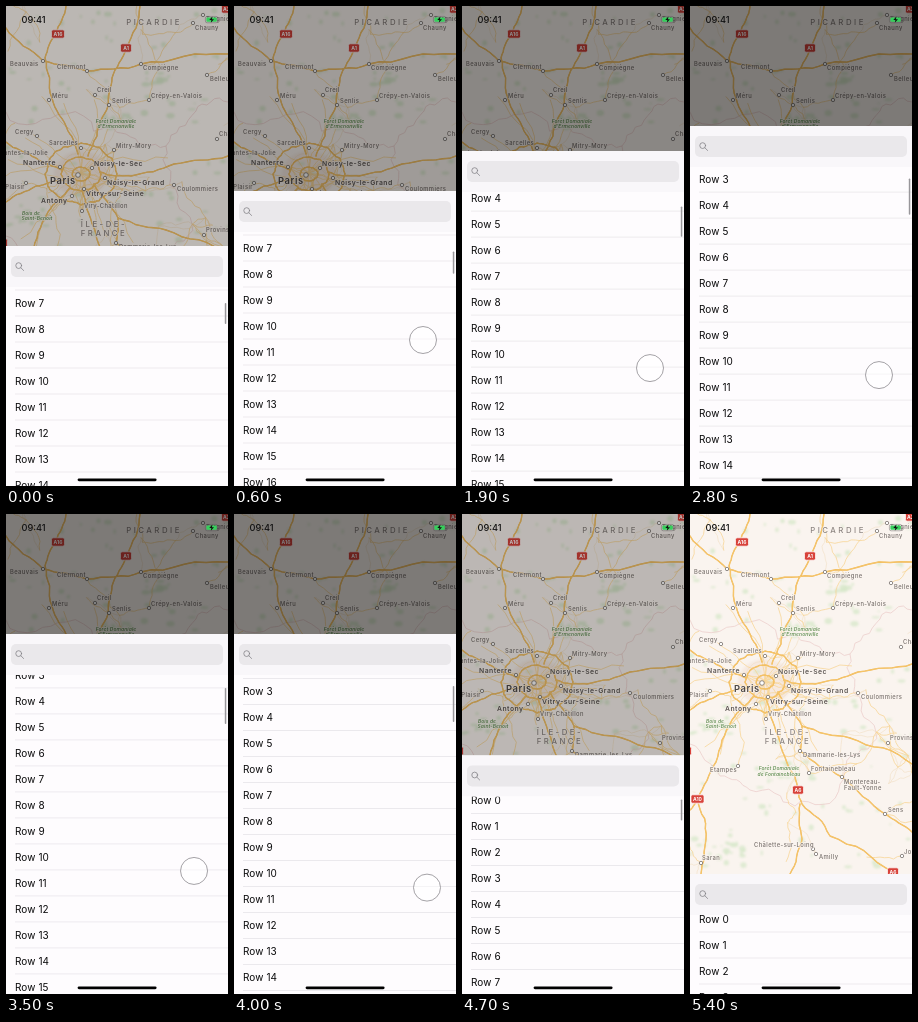
Write an HTML page that moves like this. It is 222 px wide and 480 px high and loops after 5.5 s.

```html
<!DOCTYPE html>
<html lang="en">
<head>
<meta charset="utf-8">
<title>Map drawer</title>
<style>
  html, body { margin: 0; width: 100%; height: 100%; overflow: hidden; background: #fff; }
  svg { display: block; width: 100vw; height: 100vh; font-family: Inter, Roboto, sans-serif; }
  .label { paint-order: stroke; stroke: #fbf5f0; stroke-width: 1.3px; stroke-opacity: .85; stroke-linejoin: round; }
  .town { font-size: 5.8px; font-weight: 500; letter-spacing: .42px; fill: #77706c; }
  .city { font-size: 6.8px; font-weight: 600; letter-spacing: .5px; fill: #5c5653; }
  .capital { font-size: 9.4px; font-weight: 600; letter-spacing: .6px; fill: #4c4745; }
  .wood { font-size: 4.9px; font-weight: 600; font-style: italic; letter-spacing: .12px; fill: #67945a; text-anchor: middle; }
  .region { font-size: 7.8px; font-weight: 500; letter-spacing: 2.5px; fill: #8b8480; text-anchor: middle; }
  .badge { font-size: 5px; font-weight: 700; fill: #fff; text-anchor: middle; }
  .row { font-size: 10px; font-weight: 400; letter-spacing: .08px; fill: #0b0b0c; }
</style>
</head>
<body>
<svg viewBox="0 0 222 480" preserveAspectRatio="none">
  <defs>
    <clipPath id="listClip"><rect y="41" width="222" height="460"/></clipPath>
    <filter id="soft" x="-30%" y="-30%" width="160%" height="160%"><feGaussianBlur stdDeviation=".8"/></filter>
  </defs>
  <rect width="222" height="480" fill="#faf4ef"/>
  <g id="land" filter="url(#soft)"></g>
  <g id="roads" fill="none" stroke-linejoin="round" stroke-linecap="round"></g>
  <g id="labels"></g>
  <rect id="dim" width="222" height="480"/>
  <g id="sheet">
    <rect width="222" height="480" fill="#fefcfe"/>
    <g clip-path="url(#listClip)"><g id="rows"></g></g>
    <rect width="222" height="41" fill="#f9f7fa"/>
    <rect x="5" y="10" width="212" height="21" rx="5" fill="#eae8eb"/>
    <g fill="none" stroke="#858388" stroke-width=".8" stroke-linecap="round">
      <circle cx="12.7" cy="19.6" r="2.9"/><path d="M14.9 21.8L17.6 24.5"/>
    </g>
  </g>
  <rect id="bar" x="218.8" width="1.5" rx=".75" fill="#98969a"/>
  <circle id="touch" r="13.5" fill="#fff" fill-opacity=".5" stroke="#8d8b90" stroke-width=".8"/>
  <text x="15.5" y="17.2" font-size="9.2" font-weight="500" fill="#111">09:41</text>
  <rect x="199.4" y="10.4" width="12.4" height="6.4" rx="1.8" fill="none" stroke="#555" stroke-opacity=".6" stroke-width=".7"/>
  <rect x="200.4" y="11.4" width="10.4" height="4.4" rx="1" fill="#35d05b"/>
  <path d="M212.7 12.4Q214.2 13.6 212.7 14.8Z" fill="#555" fill-opacity=".7"/>
  <path d="M206.4 10.6L203.3 14H205.4L204.8 16.8L208 13.2H205.9Z" fill="#111"/>
  <rect x="71.6" y="472.4" width="79" height="2.8" rx="1.4" fill="#000"/>
</svg>
<script>
const LOOP = 5500, TOP = 120, BOTTOM = 360, PITCH = 26, HEAD = 41;
const $ = id => document.getElementById(id);

function add(parent, tag, attrs, text) {
  const el = document.createElementNS('http://www.w3.org/2000/svg', tag);
  for (const k in attrs) el.setAttribute(k, attrs[k]);
  if (text !== undefined) el.textContent = text;
  parent.appendChild(el);
  return el;
}

let seed = 41;
const rand = () => (seed = (seed * 16807) % 2147483647) / 2147483647;

// Splits a polyline with small random bends so it reads as a road.
function wander(points, bend) {
  for (let pass = 0; pass < 3; pass++) {
    const out = [points[0]];
    for (let i = 1; i < points.length; i++) {
      const [x, y] = points[i - 1], [u, v] = points[i];
      const k = (rand() - .5) * bend;
      out.push([(x + u) / 2 + (v - y) * k, (y + v) / 2 - (u - x) * k], [u, v]);
    }
    points = out;
  }
  return 'M' + points.map(p => p[0].toFixed(1) + ' ' + p[1].toFixed(1)).join('L');
}

function pairs(line) {
  const n = line.split(' ').map(Number);
  return n.filter((_, i) => i % 2 < 1).map((x, i) => [x, n[2 * i + 1]]);
}

// name, label x, baseline, dot x, dot y, class, anchor
const towns = [
  ['Beauvais', 4, 60, 37, 55], ['Clermont', 51, 63, 81, 65], ['Compiègne', 137, 64, 135, 58],
  ['Creil', 91, 86, 89, 89], ['Senlis', 106, 97, 103, 99], ['Méru', 46, 92, 43, 94],
  ['Crépy-en-Valois', 145, 92, 143, 94], ['Chauny', 189, 24, 187, 17], ['Tergnier', 200, 15, 197, 9],
  ['Belleu', 204, 75, 201, 69], ['Cergy', 9, 128, 31, 130], ['Sarcelles', 43, 139, 75, 142],
  ['Mitry-Mory', 110, 142, 108, 144], ['Château', 213, 130, 211, 133],
  ['Nanterre', 17, 159, 54, 161, 'city'], ['Noisy-le-Sec', 88, 160, 86, 162, 'city'],
  ['Paris', 44, 177.5, 72, 169, 'capital'], ['Noisy-le-Grand', 101, 179, 99, 172, 'city'],
  ['Vitry-sur-Seine', 80, 190, 78, 183, 'city'], ['Antony', 35, 196.5, 66, 190, 'city'],
  ['Coulommiers', 171, 185, 168, 179], ['Plaisir', 19, 183, 20, 177, 'town', 'end'],
  ['Mantes-la-Jolie', 42, 149, -5, 143, 'town', 'end'], ['Viry-Châtillon', 78, 202, 76, 205],
  ['Dammarie-les-Lys', 113, 243, 110, 237], ['Étampes', 20, 258, 48, 252],
  ['Fontainebleau', 121, 257, 119, 259], ['Montereau-', 154, 270, 152, 263], ['Fault-Yonne', 154, 276],
  ['Provins', 200, 226, 198, 229], ['Sens', 198, 298, 195, 300],
  ['Châlette-sur-Loing', 64, 333, 123, 335], ['Amilly', 129, 345, 126, 340],
  ['Saran', 12, 346, 11, 349], ['Joigny', 214, 340, 212, 342]
];
const woods = [
  ['Forêt Domaniale', 110, 117], ["d'Ermenonville", 110, 122], ['Bois de', 25, 209], ['Saint-Benoît', 31, 214],
  ['Forêt Domaniale', 89, 256], ['de Fontainebleau', 89, 261.5]
];
const regions = [['PICARDIE', 148, 19], ['ÎLE-DE-', 98, 221], ['FRANCE', 98, 230]];
const badges = [['A16', 52, 28], ['A1', 120, 42], ['A6', 108, 276], ['A10', 7.5, 285], ['A6', 203, 358], ['A11', -5, 237], ['A26', 222, 3]];
const highways = [
  '60 0 50 28 39 52 46 92 62 125 72 148', '134 0 121 42 106 72 102 100 91 130 82 150',
  '94 166 125 170 168 158 222 150', '88 178 112 212 160 224 222 250', '76 184 88 222 105 262 112 290 140 322 204 358',
  '64 182 42 206 26 248 8 285 0 296', '56 164 30 152 0 136', '58 174 30 180 0 196', '110 290 112 325 100 360',
  '8 285 16 325 11 360', '0 22 37 55 81 65 135 58 222 48', '112 212 110 237 152 263 195 300 222 318'
];
const borders = ['0 106 60 108 120 128 160 140 172 190 178 235 150 270 105 292 60 276 30 262 0 230', '160 140 190 105 222 96'];

function buildMap() {
  const land = $('land'), roads = $('roads'), labels = $('labels');
  const blob = (cx, cy, rx, ry, fill) => add(land, 'ellipse', { cx, cy, rx, ry, fill, opacity: .75 });
  const grove = (x, y, w, h, n) => {
    while (n--) blob(x + (rand() - .5) * w, y + (rand() - .5) * h, 1 + rand() * 3.2, .8 + rand() * 2.2, '#d5e7c8');
  };
  blob(75, 168, 27, 23, '#f4e6dc');
  grove(111, 180, 222, 360, 130);
  grove(110, 116, 30, 16, 14);
  grove(22, 210, 36, 24, 16);
  grove(90, 258, 36, 20, 16);
  grove(150, 74, 26, 18, 12);
  grove(34, 338, 46, 18, 16);

  const nodes = towns.filter(t => t[3] !== undefined).map(t => [t[3], t[4]]);
  for (let i = 0; i < 60; i++) nodes.push([rand() * 236 - 7, rand() * 380 - 10]);
  let minor = '', mid = '', major = '';
  nodes.forEach((a, i) => nodes.slice(0, i).forEach(b => {
    const d = Math.hypot(a[0] - b[0], a[1] - b[1]);
    if (d > 50 || rand() < d / 58) return;
    if (rand() < .6) mid += wander([a, b], .3); else minor += wander([a, b], .35);
  }));
  // Spokes leaving the capital, and the ring roads around it.
  for (let i = 0; i < 20; i++) {
    const a = i * Math.PI / 10 + rand() * .3, r = 34 + rand() * 55;
    mid += wander([[75, 167], [75 + r * Math.cos(a), 167 + r * Math.sin(a)]], .25);
  }
  for (const [rx, ry] of [[9, 7], [20, 17], [36, 31]]) {
    const ring = Array.from({ length: 13 }, (_, i) => [75 + rx * Math.cos(i * Math.PI / 6), 168 + ry * Math.sin(i * Math.PI / 6)]);
    major += wander(ring, .2);
  }
  for (const line of highways) major += wander(pairs(line), .14);
  const edge = borders.map(line => wander(pairs(line), .5)).join('');

  add(roads, 'path', { d: edge, stroke: '#ecd0cd', 'stroke-width': .8 });
  add(roads, 'path', { d: minor, stroke: '#f1dfc4', 'stroke-width': .6 });
  add(roads, 'path', { d: mid, stroke: '#f8d698', 'stroke-width': .8 });
  add(roads, 'path', { d: major, stroke: '#eeb759', 'stroke-width': 1.4 });
  add(roads, 'path', { d: major, stroke: '#f8c86c', 'stroke-width': .9 });

  const put = (cls, anchor) => ([text, x, y]) => {
    const el = add(labels, 'text', { x, y, class: 'label ' + cls }, text);
    if (anchor) el.setAttribute('text-anchor', anchor);
  };
  regions.forEach(put('region'));
  woods.forEach(put('wood'));
  for (const t of towns) {
    const [, , , cx, cy, cls = 'town', anchor] = t;
    if (cx !== undefined) add(labels, 'circle', { cx, cy, r: cls === 'capital' ? 2.3 : 1.7, fill: '#fff', stroke: '#77706c', 'stroke-width': .8 });
    put(cls, anchor)(t);
  }
  for (const [text, x, y] of badges) {
    const w = text.length > 2 ? 13 : 11;
    add(labels, 'rect', { x: x - w / 2, y: y - 4.2, width: w, height: 8.4, rx: 1.6, fill: '#d8423a', stroke: '#fff', 'stroke-width': .7 });
    add(labels, 'text', { x, y: y + 1.9, class: 'badge' }, text);
  }
}

function buildRows() {
  for (let i = 0; i < 30; i++) {
    const y = i * PITCH;
    add($('rows'), 'text', { x: 9, y: y + 3.6, class: 'row' }, 'Row ' + i);
    add($('rows'), 'rect', { x: 9, y: y + 12.7, width: 213, height: .6, fill: '#e0dee2' });
  }
}

// Finger travel as [time, position of row 0]; it rests at each turning point.
const drag = [[0, 115], [600, 60], [1000, 101], [1300, 79], [1550, 61], [1900, 88], [2080, 100], [2550, 75],
  [2800, 95], [3020, 108], [3500, 83], [3720, 75], [4500, 190], [4600, 203]];
const sway = [[0, 189], [1300, 189], [1900, 188], [2800, 189], [3600, 188], [4500, 204], [4600, 205]];
const RELEASE = 4600;

function slope(keys, i) {
  const a = keys[i - 1], b = keys[i], c = keys[i + 1];
  if (!a) return 0;
  if (!c) return (b[1] - a[1]) / (b[0] - a[0]);
  return (b[1] - a[1]) * (c[1] - b[1]) <= 0 ? 0 : (c[1] - a[1]) / (c[0] - a[0]);
}

function curve(keys, t) {
  const n = keys.length - 1;
  if (t >= keys[n][0]) return keys[n][1];
  let i = 0;
  while (t >= keys[i + 1][0]) i++;
  const [t0, a] = keys[i], [t1, b] = keys[i + 1], h = t1 - t0, s = (t - t0) / h, q = 1 - s;
  return a * (1 + 2 * s) * q * q + b * s * s * (3 - 2 * s) + h * s * q * (q * slope(keys, i) - s * slope(keys, i + 1));
}

// Upward drags lift the sheet before scrolling; downward drags unscroll before lowering it.
function pose(t) {
  let top = 240, scroll = 170, at = drag[0][1];
  const stops = drag.filter(k => k[0] > 0 && k[0] < t).map(k => k[1]);
  for (const next of [...stops, curve(drag, t)]) {
    const d = next - at;
    if (d < 0) {
      const lift = Math.min(-d, top - TOP);
      top -= lift;
      scroll += -d - lift;
    } else {
      const back = Math.min(d, scroll);
      scroll -= back;
      top += d - back;
    }
    at = next;
  }
  if (t > RELEASE) {
    const k = (t - RELEASE) * .014;
    top = t > 5100 ? BOTTOM : BOTTOM - (BOTTOM - top) * (1 + k) * Math.exp(-k);
  }
  return { top, scroll, finger: at + 274 };
}

function render(t) {
  const { top, scroll, finger } = pose(t);
  $('dim').setAttribute('opacity', (.5 * (BOTTOM - top) / (BOTTOM - TOP)).toFixed(3));
  $('sheet').setAttribute('transform', `translate(0 ${top.toFixed(2)})`);
  $('rows').setAttribute('transform', `translate(0 ${(45 - scroll).toFixed(2)})`);

  const view = 480 - top - HEAD, bar = $('bar');
  bar.setAttribute('y', top + HEAD + 3 + scroll * view / 2600);
  bar.setAttribute('height', Math.max(21, (view - 20) ** 2 / 2480));
  bar.setAttribute('opacity', Math.max(0, Math.min(1, (5050 - t) / 300)));

  const touch = $('touch');
  touch.setAttribute('cx', curve(sway, t));
  touch.setAttribute('cy', finger);
  touch.setAttribute('visibility', t >= 100 && t < RELEASE ? 'visible' : 'hidden');
}

buildMap();
buildRows();
const start = performance.now();
function tick() {
  render((performance.now() - start) % LOOP);
  requestAnimationFrame(tick);
}
tick();
</script>
</body>
</html>
```
